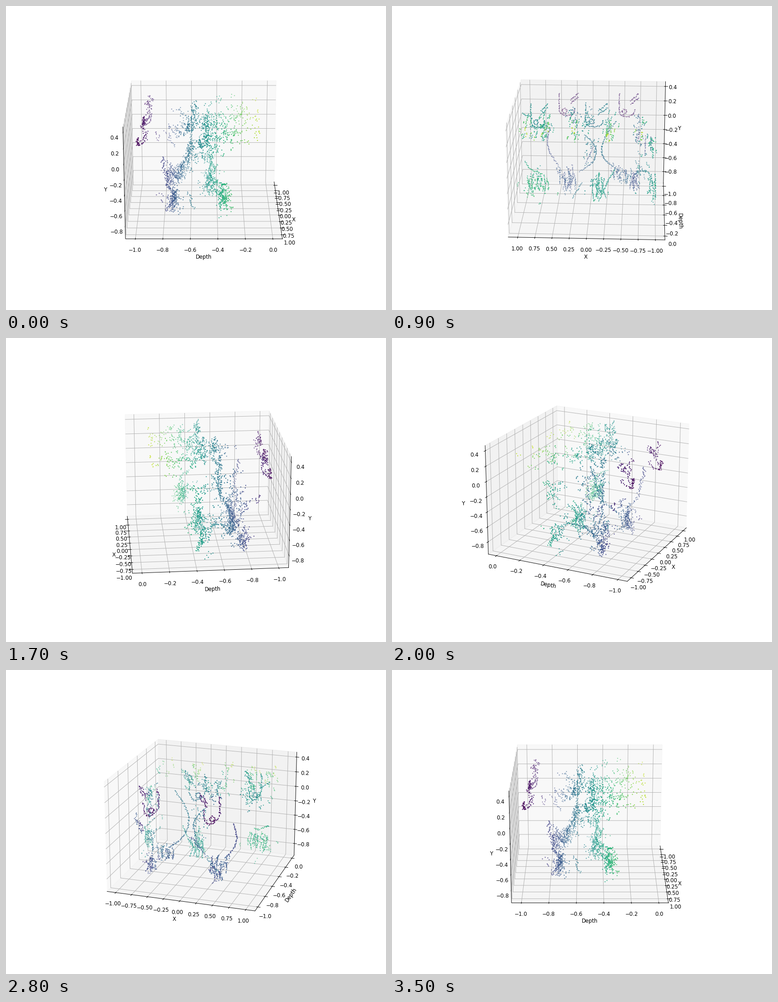
Animation of 837 by 669 pixels, one loop 3.6 s. Source, as a matplotlib script:

```python
import numpy as np
import matplotlib.pyplot as plt
from matplotlib.animation import FuncAnimation

FRAMES, ELEV = 36, 20
rng = np.random.default_rng(8)
cloud = []


def dots(x, depth, z, rough=0.004):
    """Add dots with a little jitter across and in depth."""
    p = np.stack(np.broadcast_arrays(x, depth, z), axis=1)
    p = p + rng.normal(0, 1, p.shape) * [rough, 0.007, rough]
    p[:, 1] = np.clip(p[:, 1], -1, -0.003)
    cloud.append(p)


def bend(a, b, c, gap=0.011):
    """Dots on the parabola through three (x, depth, z) points."""
    a, b, c = np.array([a, b, c])
    size = np.linalg.norm((b - a)[[0, 2]]) + np.linalg.norm((c - b)[[0, 2]])
    t = np.linspace(0, 1, max(4, int(size / gap)))[:, None]
    p = (a * (1 - t) * (1 - 2 * t) + b * 4 * t * (1 - t)
         + c * t * (2 * t - 1))
    drift = 0.012 * np.sin(9 * t[:, 0] + rng.uniform(0, 6))
    dots(p[:, 0], p[:, 1] + drift, p[:, 2])


def line(a, b):
    bend(a, (np.array(a) + b) / 2, b)


def head(x, depth, chin, w=0.12):
    """Jaw, one tall cheek, a slanted fringe and a small mouth."""
    t = np.linspace(np.pi, 2 * np.pi, 32)
    side = depth + 0.06 * np.cos(t) ** 2
    dots(x + w * np.cos(t), side, chin + 0.13 * (1 + np.sin(t)))
    line((x + w, depth + 0.06, chin + 0.13), (x + w, depth + 0.04, chin + 0.33))
    for drop in (0, 0.05):
        line((x - 1.5 * w, depth + 0.06, chin + 0.34 - drop),
             (x - 0.5 * w, depth + 0.04, chin + 0.24 - drop))
    t = np.linspace(0, 2 * np.pi, 18)
    dots(x + w * (0.35 + 0.3 * np.cos(t)), depth, chin + 0.07 + 0.03 * np.sin(t))


def haze(x, depth, z, sx, sd, sz, n):
    """Short upright runs of dots scattered around a centre."""
    k = np.arange(3)
    for c in rng.normal([x, depth, z], [sx, sd, sz], (n // 3, 3)):
        lean = rng.normal(0, 0.008)
        dots(c[0] + lean * k, c[1] + rng.normal(0, 0.015, 3), c[2] - 0.016 * k)


def folds(x, depth, top, low, w, n):
    """Ragged, nearly vertical strokes with haze around them."""
    for u in np.linspace(-w, w, n):
        z0, z1 = np.sort(rng.uniform(low, top, 2))
        z0, z1 = (z0 + low) / 2, (z1 + top) / 2
        d0, d1 = depth + rng.normal(0, 0.025, 2)
        bend((x + u, d0, z1),
             (x + u + rng.normal(0, 0.02), (d0 + d1) / 2, (z0 + z1) / 2),
             (x + u + rng.normal(0, 0.02), d1, z0))
    haze(x, depth, (top + low) / 2, w * 0.8, 0.045, (top - low) / 4, 10 * n)


def backdrop(x, n):
    """Far dots in a column; the further back, the higher they stay."""
    depth = -0.03 - 0.47 * rng.beta(2, 1.3, n)
    z = rng.uniform(0.2 + 0.5 * (depth + 0.1), 0.38, n)
    for cx, d, cz in zip(x + rng.normal(0, 0.06, n), depth, z):
        k = np.arange(3)
        dots(cx + 0.006 * k, d + rng.normal(0, 0.012, 3), cz - 0.016 * k)


head(-0.54, -0.97, 0.03)
head(0.40, -0.99, 0.02)
head(-0.06, -0.62, 0.08, 0.13)
head(0.78, -0.53, 0.11, 0.10)
line((0.86, -0.50, 0.25), (1.0, -0.47, 0.33))
line((-0.74, -0.87, -0.13), (-0.71, -0.86, -0.24))

# Torsos, arms and sleeves
bend((-0.39, -0.59, 0.17), (-0.17, -0.62, -0.25), (-0.44, -0.69, -0.55))
bend((-0.95, -0.48, -0.62), (-0.92, -0.50, -0.50), (-0.84, -0.52, -0.46))
bend((-0.86, -0.53, -0.46), (-0.70, -0.68, -0.58), (-0.66, -0.77, -0.85))
bend((0.09, -0.60, -0.02), (-0.08, -0.63, -0.30), (0.18, -0.70, -0.59))
bend((0.64, -0.79, -0.06), (0.67, -0.78, -0.32), (0.46, -0.72, -0.58))
bend((0.70, -0.34, -0.39), (0.84, -0.36, -0.36), (0.97, -0.40, -0.28))
line((-0.84, -0.80, -0.15), (-0.83, -0.74, -0.36))
line((-0.92, -0.74, -0.11), (-0.92, -0.72, -0.27))
line((-0.02, -0.78, -0.30), (0.08, -0.73, -0.48))
line((0.14, -0.62, -0.69), (0.27, -0.58, -0.87))
line((-0.37, -0.46, -0.39), (-0.14, -0.43, -0.81))

folds(-0.68, -0.76, -0.58, -0.87, 0.04, 4)
folds(-0.50, -0.70, -0.52, -0.74, 0.12, 6)
folds(0.38, -0.73, -0.53, -0.87, 0.11, 7)
folds(-0.13, -0.44, -0.40, -0.81, 0.09, 6)
folds(-0.95, -0.45, -0.42, -0.80, 0.04, 3)
folds(0.78, -0.36, -0.40, -0.68, 0.15, 8)

haze(-0.72, -0.66, 0.05, 0.04, 0.06, 0.13, 60)
haze(0.00, -0.52, 0.22, 0.10, 0.08, 0.07, 60)
haze(0.25, -0.64, 0.25, 0.07, 0.07, 0.06, 36)
haze(0.74, -0.45, 0.15, 0.10, 0.06, 0.08, 75)
haze(-0.94, -0.42, 0.00, 0.04, 0.04, 0.09, 54)
haze(-0.80, -0.57, -0.42, 0.08, 0.07, 0.13, 54)
haze(0.00, -0.60, -0.18, 0.07, 0.03, 0.11, 45)

for col, amount in ((-0.78, 9), (-0.30, 30), (0.20, 22), (0.64, 26), (0.90, 16)):
    backdrop(col, amount)

x, y, z = np.vstack(cloud).T

fig = plt.figure(figsize=(10, 7.993), dpi=83.7)
ax = fig.add_subplot(projection="3d")
ax.scatter(x, y, z, c=y, cmap="viridis", vmin=-1, vmax=0, s=1)
ax.set(xlim=(-1.138, 1.138), ylim=(-1.0725, 0.0695), zlim=(-0.966, 0.467),
       xlabel="X", ylabel="Depth", zlabel="Y")


def update(i):
    ax.view_init(elev=ELEV, azim=i * 360 / (FRAMES - 1) % 360)
    return ()


anim = FuncAnimation(fig, update, frames=FRAMES, interval=100,
                     repeat=True, repeat_delay=0)
plt.show()
```
